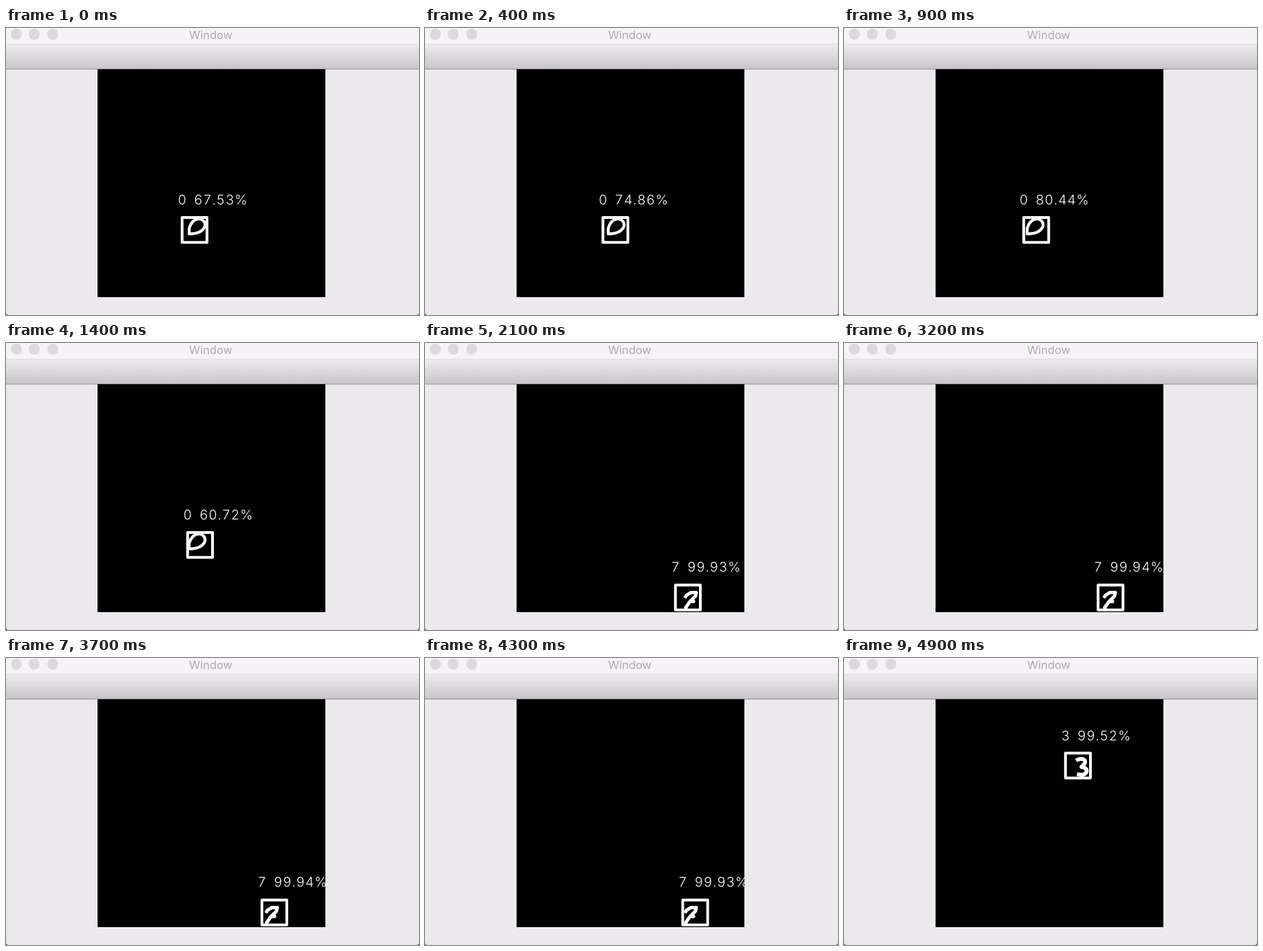
An HTML page for the animation above (5.1 s loop, 600 px wide and 418 px high).

```html
<!DOCTYPE html>
<html lang="en">
<meta charset="utf-8">
<title>Window</title>
<style>
html, body { margin: 0; width: 100%; height: 100%; overflow: hidden; background: #555; }
#win { position: relative; width: 600px; height: 418px; background: #ebe9eb; overflow: hidden; border-radius: 0 0 4px 4px; }
#title { height: 23px; background: #f5f3f5; border-bottom: 1px solid #dcdadc;
  font: 16.4px/20px Inter, Roboto, sans-serif; color: #acaaac; text-align: center; text-indent: -5px; }
#bar { height: 35px; background: linear-gradient(#edebed, #c8c6c8); border-bottom: 1px solid #a3a1a3; box-shadow: 0 1px #c8c6c8; }
i { position: absolute; top: 1px; width: 16px; height: 16px; border-radius: 50%; background: #dbd9db; }
svg { position: absolute; left: 133px; top: 60px; width: 331px; height: 332px; background: #000; }
rect, path { fill: none; stroke: #fff; stroke-width: 3.1; stroke-linejoin: round; }
text { fill: #fff; font: 300 15px Inter, Roboto, sans-serif; font-variant-numeric: tabular-nums;
  letter-spacing: .6px; word-spacing: 3.2px; text-rendering: geometricPrecision; }
</style>
<div id="win">
  <div id="title">Window</div>
  <div id="bar"></div>
  <i style="left:6.5px"></i><i style="left:33px"></i><i style="left:59.5px"></i>
  <svg viewBox="0 0 256 256" preserveAspectRatio="none">
    <path/>
    <rect width="28" height="28"/>
    <text></text>
  </svg>
</div>
<script>
const [ink, box, label] = ['path', 'rect', 'text'].map(tag => document.querySelector(tag));

// Each digit stays put while the search box slides over it
const scenes = [
  { digit: 0, x: 95, y: 166.5, weight: 3.2,
    shape: 'M103 185V179Q106 168 115 168Q123 171 120 178Q116 185 103 185Z',
    scores: { 0: '67.53', 400: '74.86', 900: '80.44', 1400: '60.72' } },
  { digit: 7, x: 178.5, y: 225.5, weight: 3.8,
    shape: 'M189 240L191 237L196 234H202L201 238L195 244H199H195L190 251L192 252',
    scores: { 2100: '99.93', 2700: '99.94', 3200: '99.94', 3700: '99.94', 4300: '99.93' } },
  { digit: 3, x: 146, y: 60.5, weight: 4.4,
    shape: 'M158 69Q162 66 166 67.5Q171 70 164 76Q171 77 169.5 82Q167 86.5 159 84',
    scores: { 4900: '99.52' } }
];
const slide = 2.06;
const steps = scenes.flatMap(scene => Object.entries(scene.scores).map(
  ([start, score], k) => ({ ...scene, start: +start, score, x: scene.x + k * slide })));

function set(node, attrs) {
  for (const name in attrs) node.setAttribute(name, attrs[name]);
}

let shown;
function draw(now) {
  const step = steps.findLast(s => s.start <= now % 5100);
  if (step !== shown) {
    shown = step;
    const { digit, score, shape, weight, x, y } = step;
    set(ink, { d: shape, style: `stroke-width:${weight}` });
    set(box, { x, y });
    set(label, { x: x - 4.9, y: y - 14.6 });
    label.textContent = `${digit} ${score}%`;
  }
  requestAnimationFrame(draw);
}
draw(0);
</script>
</html>
```
